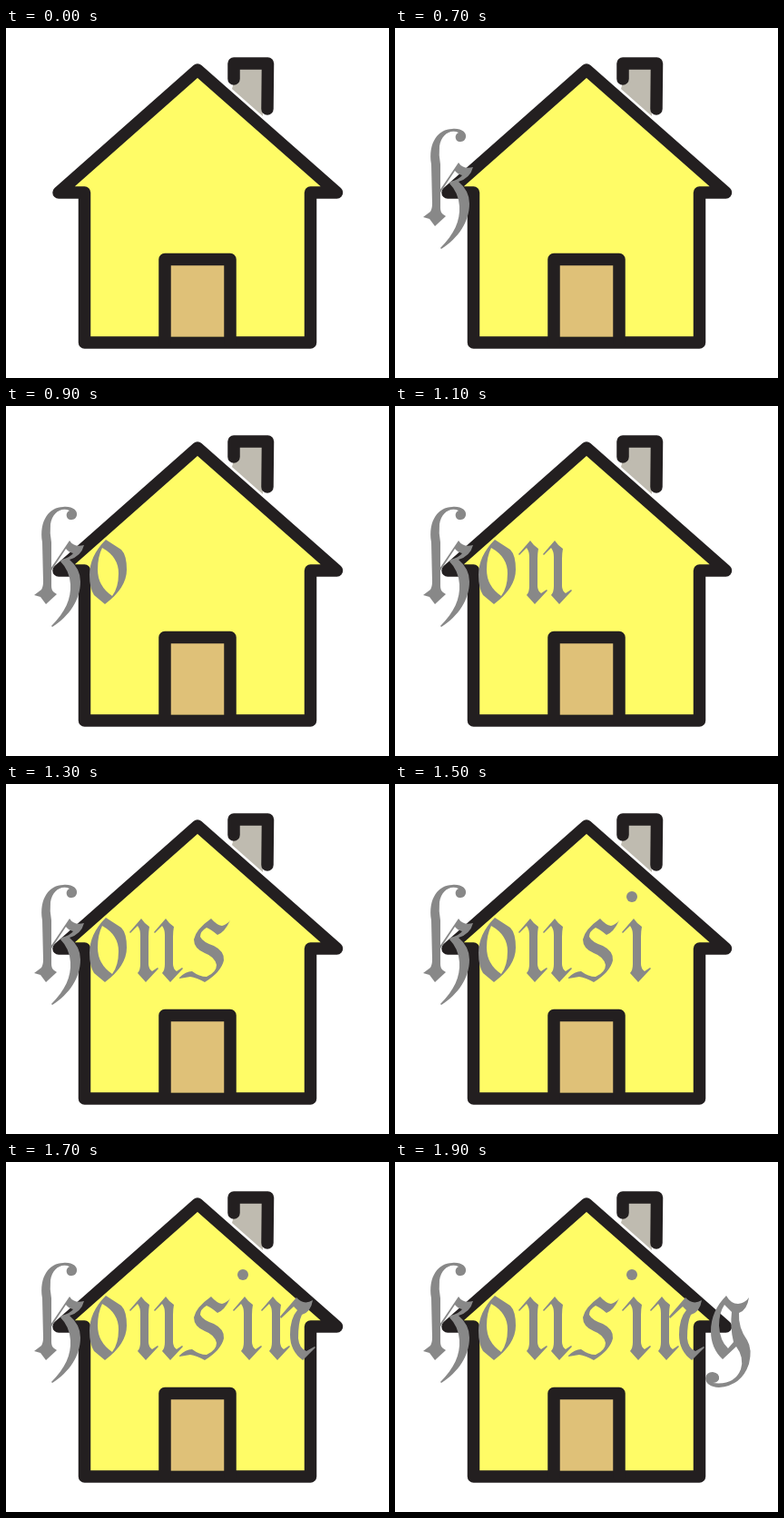
An HTML page that plays this animation: 422 by 385 pixels, repeating every 2.6 s.

```html
<!DOCTYPE html>
<html lang="en">
<head>
<meta charset="utf-8">
<title>housing</title>
<style>
  html, body { margin: 0; width: 100%; height: 100%; overflow: hidden; background: #fff; }
  svg { display: block; width: 100%; height: 100%; }
  .ink { fill: none; stroke: #231f20; stroke-width: 13.5; stroke-linecap: round; stroke-linejoin: round; }
  .letter { fill: #888; fill-rule: evenodd; opacity: 0; }
</style>
</head>
<body>
<svg viewBox="0 0 422 385" role="img" aria-label="housing">
  <path fill="#bfbbb0" d="M255 45H283V97L249 67Z"/>
  <path class="ink" d="M251 56V39H288.500L288 89"/>
  <path style="fill:#fffc66" class="ink" d="M58 181L211 46L364.500 181H335.500V346H86.500V181Z"/>
  <path fill="#dfc178" d="M175 255H247V339.500H175Z"/>
  <path class="ink" d="M175 345V254.500H247V345"/>
  <g id="word"></g>
</svg>
<script>
  const LOOP = 2600, FIRST = 700, STEP = 200;
  const word = document.getElementById('word');

  // Blackletter minim: a stem with a slanted head and a pointed foot.
  const minim = x => ({
    d: 'M-16 15L-3 0Q1 6 6 9Q5 14 5 20V50Q5 55 9 58L15 54L16 55L2 70L-7 60Q-4 57 -4 50V18Q-4 12 -7 8L-15 16Z',
    transform: `translate(${x} 148)`
  });
  const shape = d => ({ d });

  const letters = [
    // h
    [shape('M40 150C36 126 48 111 63 111C73 110 79 115 78 120C77 126 69 127 67 122C66 118 68 116 70 115C60 111 51 118 49 130Q48 140 50 150V198Q50 203 53 205L56 207L44 218L38 210L31 208L39 202Q41 199 41 193Z'),
     shape('M49 179L70 148Q75 156 86 153Q83 165 70 169Q82 179 82 193C82 213 70 231 51 243L50 242C65 227 72 212 71 196Q70 181 60 171L61 169Q70 167 74 162Q69 161 66 157L50 181Z')],
    // o
    [shape('M110 147L127 158Q133 164 133 180Q133 200 109 218L97 208Q92 200 92 186Q92 165 110 147ZM106 156Q101 166 101 180Q101 198 117 209Q124 200 124 184Q124 166 106 156Z')],
    // u
    [minim(152), minim(179)],
    // s
    [shape('M191 213Q198 206 205 206Q213 212 221 212Q232 207 232 199Q230 190 219 186Q207 181 207 171Q209 160 226 148Q232 155 238 156Q244 154 247 150Q241 163 233 166Q226 160 221 158Q214 162 214 168Q217 174 229 178Q241 184 240 194Q237 207 219 218Q210 213 203 212Q197 213 191 214Z')],
    // i
    [shape('M255 124A6 6 0 1 1 267 124A6 6 0 1 1 255 124Z'), minim(266)],
    // n
    [minim(297),
     shape('M302 170L320 149Q328 158 338 152Q336 165 326 168Q322 176 322 194Q323 205 331 208L340 203L341 204L327 218Q313 208 313 190Q313 172 321 163L317 159L303 172Z')],
    // g
    [shape('M365 147Q370 156 378 156Q386 155 390 149Q388 163 379 166Q378 182 388 196Q394 206 390 222Q382 246 357 248Q343 247 342 238Q343 231 350 231Q358 232 357 239Q355 243 350 243Q374 246 381 228Q385 215 376 203L361 217Q348 205 348 186Q348 164 365 147ZM363 157Q357 166 357 180Q358 197 367 205L373 198Q369 182 371 165Z')]
  ];

  const make = (tag, attrs, parent) => {
    const el = document.createElementNS('http://www.w3.org/2000/svg', tag);
    for (const key in attrs) el.setAttribute(key, attrs[key]);
    return parent.appendChild(el);
  };

  letters.forEach((parts, i) => {
    const letter = make('g', { class: 'letter' }, word);
    parts.forEach(part => make('path', part, letter));
    letter.animate([
      { opacity: 0, offset: 0, easing: 'step-end' },
      { opacity: 1, offset: (FIRST + i * STEP) / LOOP },
      { opacity: 1, offset: 1 }
    ], { duration: LOOP, iterations: Infinity }).startTime = 0;
  });
</script>
</body>
</html>
```
